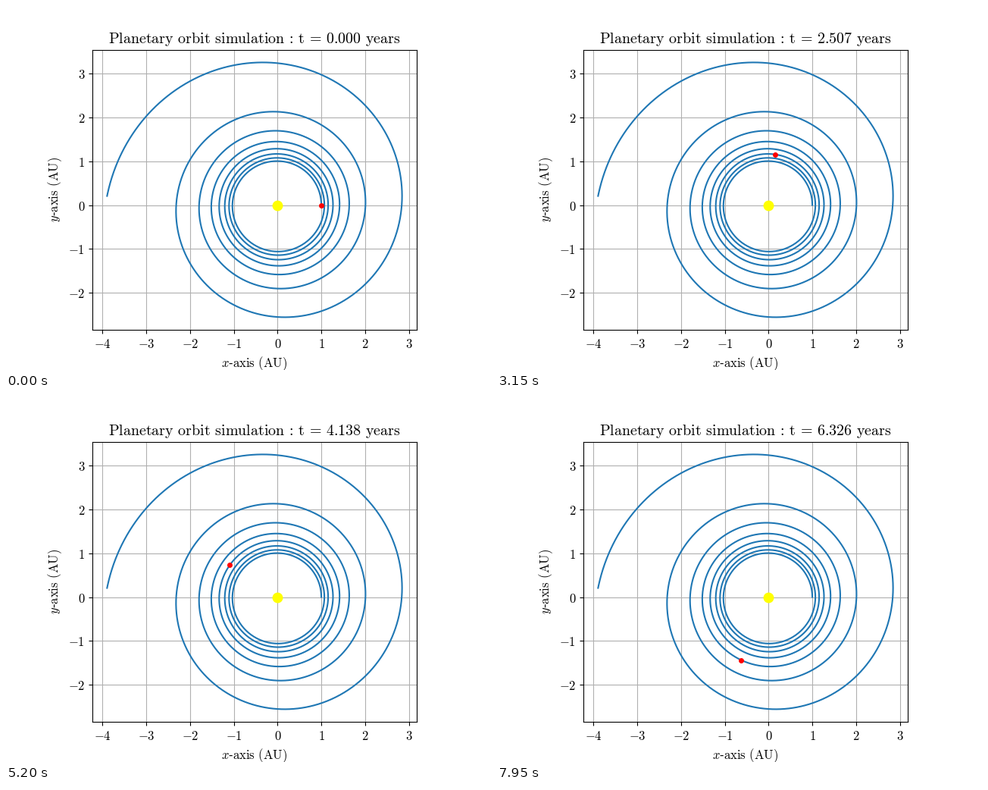
A matplotlib script for the animation above (8000 ms loop, 640x480 px).

```python
import numpy as np
import matplotlib.pyplot as plt
from matplotlib.animation import FuncAnimation

plt.rcParams.update({"font.size": 12, "mathtext.fontset": "cm"})

FRAMES, INTERVAL = 160, 50
THRUST = 0.005              # constant push along the velocity, GM = 1
DT, T_END = 0.025, 100.0
STEPS_PER_FRAME = 10
YEAR = 2 * np.pi


def deriv(s):
    pos, vel = s[:2], s[2:]
    acc = -pos / np.hypot(*pos) ** 3 + THRUST * vel / np.hypot(*vel)
    return np.concatenate([vel, acc])


def integrate():
    s = np.array([1.0, 0.0, 0.0, 1.0])
    path = [s[:2]]
    for _ in range(round(T_END / DT)):
        k1 = deriv(s)
        k2 = deriv(s + DT / 2 * k1)
        k3 = deriv(s + DT / 2 * k2)
        k4 = deriv(s + DT * k3)
        s = s + DT / 6 * (k1 + 2 * k2 + 2 * k3 + k4)
        path.append(s[:2])
    return np.array(path)


def title_text(years):
    return rf"$\text{{Planetary orbit simulation : t = {years:.3f} years}}$"


def axis_label(name):
    return rf"${name}\text{{‐axis (AU)}}$"


path = integrate()

fig, ax = plt.subplots(figsize=(6.4, 4.8), dpi=100)
ax.plot(path[:, 0], path[:, 1])
ax.plot(0, 0, "o", color="yellow", markersize=9)
planet, = ax.plot([], [], "o", color="red", markersize=4)
ax.set_aspect("equal")
ax.grid(True)
ax.set_xticks(range(-4, 4))
ax.set_yticks(range(-2, 4))
ax.xaxis.set_major_formatter(lambda v, _: f"${v:g}$")
ax.yaxis.set_major_formatter(lambda v, _: f"${v:g}$")
ax.set_xlabel(axis_label("x"))
ax.set_ylabel(axis_label("y"))
title = ax.set_title(title_text(0))


def update(i):
    k = i * STEPS_PER_FRAME
    planet.set_data([path[k, 0]], [path[k, 1]])
    title.set_text(title_text(k * DT / YEAR))
    return planet, title


anim = FuncAnimation(fig, update, frames=FRAMES, interval=INTERVAL,
                     repeat=True, repeat_delay=0, blit=False)
plt.show()
```
